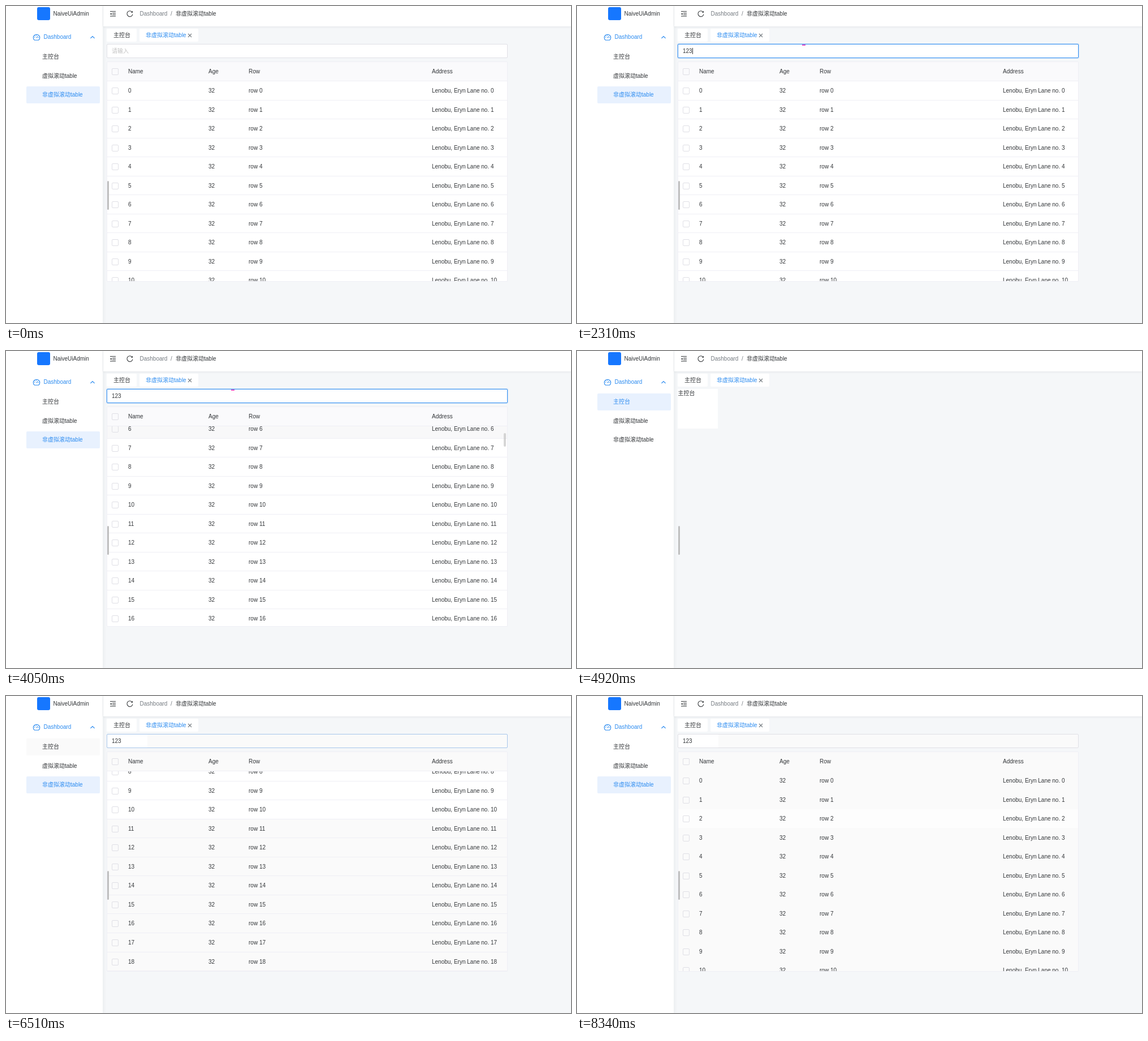
Write an HTML page that moves like this. It is 999 by 560 pixels and loops after 8.97 s.

```html
<!DOCTYPE html>
<html lang="zh">
<head>
<meta charset="utf-8">
<style>
html, body { margin: 0; width: 100%; height: 100%; overflow: hidden; background: #f5f7f9; }
body { position: relative; font: 10px/14px "Liberation Sans", "Noto Sans CJK SC", "Noto Sans CJK", sans-serif; color: #333639; }
div, span, svg { position: absolute; box-sizing: border-box; }
span { white-space: pre; }
#side { left: 0; top: 0; width: 171px; height: 560px; background: #fff; box-shadow: 2px 0 6px rgba(29,35,41,.05); }
#head { left: 172px; top: 0; width: 827px; height: 36px; background: #fff; box-shadow: 0 1px 4px rgba(0,21,41,.08); }
#logo { left: 55px; top: 2px; width: 23px; height: 23px; border-radius: 3px; background: #1677ff; }
.pick { left: 36px; width: 130px; height: 30px; border-radius: 2px; background: #e8f1fe; }
.tab { top: 40px; height: 23px; border-radius: 2px; background: #fff; }
#page { left: 0; top: 0; width: 999px; height: 560px; }
#input, #ring { left: 178px; top: 67px; width: 709px; height: 25px; border: 1px solid #e0e0e6; border-radius: 2px; }
#ring { border-color: #3d95f2; }
#table { left: 178px; top: 98px; width: 709px; height: 389px; border: 1px solid #efeff5; border-radius: 2px; overflow: hidden; }
#thead { left: 0; top: 0; width: 707px; height: 34px; border-bottom: 1px solid #efeff5; }
#view { left: 0; top: 34px; width: 707px; height: 354px; overflow: hidden; }
#rows { left: 0; top: 0; width: 707px; }
.row { left: 0; width: 707px; height: 33.53px; border-bottom: 1px solid #efeff5; }
.box { left: 8px; width: 12px; height: 12px; border: 1px solid #e0e0e6; border-radius: 2px; }
#thumb { left: 880px; width: 4px; height: 24px; border-radius: 2px; background: #bfbfbf; }
#caret { top: 74px; width: 1px; height: 11px; background: #333639; }
#mark { left: 398px; top: 68px; width: 6px; height: 2px; background: #ea4fc4; }
#card { left: 178px; top: 67px; width: 71px; height: 70px; background: #fff; }
#handle { left: 179px; top: 309px; width: 3px; height: 51px; border-radius: 2px; background: #bfbfbf; }
svg { left: 0; top: 0; fill: none; stroke-width: 1.1; pointer-events: none; }
</style>
</head>
<body>
<div id="side">
  <div class="pick" id="pickHome" style="top:75px"></div>
  <div class="pick" id="pickList" style="top:142px"></div>
  <div id="logo"></div>
</div>
<div id="head"></div>
<div class="tab" style="left:178px;width:53px"></div>
<div class="tab" style="left:236px;width:104px"></div>
<div id="page">
  <div id="input"></div><div id="ring"></div><div id="caret"></div><div id="mark"></div>
  <div id="table">
    <div id="thead"></div>
    <div id="view"><div id="rows"></div></div>
  </div>
  <div id="thumb"></div>
</div>
<div id="card"></div>
<div id="handle"></div>
<svg width="999" height="560">
  <g stroke="#333639">
    <path d="M184 9.5h10M188 12.5h6M188 15.2h6M184 18h10"/>
    <path d="M184 13.9l2.6-2v4z" fill="#333639" stroke="none"/>
    <path d="M223.2 11A5 5 0 1 0 223.9 14.6"/>
    <path d="M224 8.6v3.2h-3.2z" fill="#333639" stroke="none"/>
  </g>
  <path stroke="#767c82" d="M322 49l6 6M328 49l-6 6"/>
  <g stroke="#2d8cf0">
    <path d="M50.2 60.2A5.7 5.7 0 1 1 57.8 60.2z"/>
    <path d="M53.6 56.4l2.7-2.8M54 51v1.4M50 55.5h1.3M56.8 55.5h1.3M51.2 52.6l.8.8"/>
    <path d="M149.5 57l3.5-3.5 3.5 3.5"/>
  </g>
</svg>
<script>
const LOOP = 8970, PITCH = 33.53;
const BLUE = '#2d8cf0', DARK = '#333639', HOME = '主控台', LIST = '非虚拟滚动table';
const $ = id => document.getElementById(id);

function text(parent, x, y, str, color = DARK) {
  const el = document.createElement('span');
  el.textContent = str;
  el.style.cssText = `left:${x}px;top:${y - 7}px;color:${color}`;
  parent.append(el);
  return el;
}
function block(parent, cls, top) {
  const el = document.createElement('div');
  el.className = cls;
  el.style.top = top + 'px';
  parent.append(el);
  return el;
}
function cells(parent, y, values) {
  block(parent, 'box', y - 6);
  values.forEach((v, i) => text(parent, [37, 179, 250, 574][i], y, v));
}

const side = $('side'), page = $('page'), body = document.body;
text(side, 83.5, 14, 'NaiveUiAdmin');
text(side, 66.5, 55, 'Dashboard', BLUE);
const menuHome = text(side, 64, 90, HOME);
text(side, 64, 124, '虚拟滚动table');
const menuList = text(side, 64, 157, LIST);
text(body, 236.5, 14, 'Dashboard', '#767c82');
text(body, 291, 14, '/', '#767c82');
const crumb = text(body, 300, 14, LIST);
const tabHome = text(body, 190, 52, HOME);
const tabList = text(body, 247, 52, LIST);
const field = text(page, 187, 80, '');
text($('card'), 0.5, 8, HOME);

cells($('thead'), 17, ['Name', 'Age', 'Row', 'Address']);
const rows = Array.from({ length: 20 }, (_, i) => {
  const row = block($('rows'), 'row', i * PITCH);
  cells(row, 17, [i, 32, 'row ' + i, 'Lenobu, Eryn Lane no. ' + i]);
  return row;
});

const ramp = (t, a, b) => Math.min(1, Math.max(0, (t - a) / (b - a)));
const within = (t, a, b) => t >= a && t < b;

function scrollAt(t) {
  if (t < 5190) return 73 * ramp(t, 3300, 3450) + 140 * ramp(t, 3450, 3570);
  if (t < 7560) return 245 * ramp(t, 5760, 5910) + 39 * ramp(t, 5910, 5970);
  return 0;
}
function thumbAlpha(t) {
  if (t < 5190) return ramp(t, 2745, 2790) - ramp(t, 4035, 4080);
  if (t < 5760) return 1 - ramp(t, 5310, 5400);
  if (t < 7560) return ramp(t, 5760, 5790) - ramp(t, 6330, 6420);
  return 1 - ramp(t, 8250, 8340);
}
function rowColor(i, t, scroll) {
  if (t < 5190) {
    const hover = Math.floor((18 + scroll) / PITCH);
    return within(t, 2760, 4230) && i === hover ? '#f8f8f9' : '#fff';
  }
  if (t >= 7560) return i === 2 ? '#fdfdfd' : '#fafafa';
  return t >= 6330 && i <= 10 ? '#fff' : '#fafafa';
}

function draw(t) {
  const back = t >= 5190, late = t >= 7560;
  const atHome = within(t, 4440, 4920) || within(t, 6750, 7230);
  const homeMenu = within(t, 4440, 5190) || within(t, 6750, 7560);
  const shift = !homeMenu ? 0 : back ? ramp(t, 6750, 6960) : ramp(t, 4440, 4680);

  crumb.textContent = atHome ? HOME : LIST;
  tabHome.style.color = atHome ? BLUE : DARK;
  tabList.style.color = atHome ? DARK : BLUE;
  menuHome.style.color = homeMenu ? BLUE : DARK;
  menuList.style.color = homeMenu ? DARK : BLUE;
  const rest = within(t, 5190, 6750);
  $('pickHome').style.background = rest ? '#fafafa' : '#e8f1fe';
  $('pickHome').style.opacity = rest ? 1 : shift;
  $('pickList').style.opacity = 1 - shift;

  page.style.opacity = late ? ramp(t, 7530, 7680)
    : back ? 1 - ramp(t, 6750, 6870) : 1 - ramp(t, 4440, 4560);
  $('card').style.opacity = !homeMenu ? 0
    : back ? ramp(t, 6840, 6960) : ramp(t, 4560, 4680);

  // search field
  const typed = '123'.slice(0, (t >= 1950) + (t >= 2040) + (t >= 2310));
  field.textContent = typed || '请输入';
  field.style.color = typed ? DARK : '#c2c2c2';
  const focused = within(t, 1740, 5190);
  $('ring').style.opacity = back
    ? (t < 6750 ? ramp(t, 6330, 6420) * (1 - .65 * ramp(t, 6420, 6510)) : 0)
    : ramp(t, 1200, 1380);
  $('ring').style.boxShadow = focused
    ? `0 0 0 1px rgba(45,140,240,${.25 * ramp(t, 1740, 1890)})` : 'none';
  $('input').style.background = back
    ? 'linear-gradient(90deg, #fff 71px, #fafafa 71px)' : '#fff';
  const blink = within(t, 1740, 2775) || within(t, 3270, 3780) || within(t, 4290, 4440);
  $('caret').style.opacity = blink ? 1 : 0;
  $('caret').style.left = 187 + Math.round(5.56 * typed.length) + 'px';
  $('mark').style.opacity = focused ? 1 : 0;

  // table
  const scroll = scrollAt(t);
  $('rows').style.transform = `translateY(${-Math.round(scroll)}px)`;
  rows.forEach((row, i) => {
    row.style.background = rowColor(i, t, scroll);
    row.style.borderColor = late ? '#fafafa' : '#efeff5';
  });
  $('thead').style.background = back ? '#fafafa' : '#fafafc';
  $('thead').style.borderColor = late ? '#fafafa' : '#efeff5';
  $('thumb').style.top = 134 + scroll * .0514 + 'px';
  $('thumb').style.opacity = thumbAlpha(t);
}

const start = performance.now();
function tick() {
  draw((performance.now() - start) % LOOP);
  requestAnimationFrame(tick);
}
tick();
</script>
</body>
</html>
```
